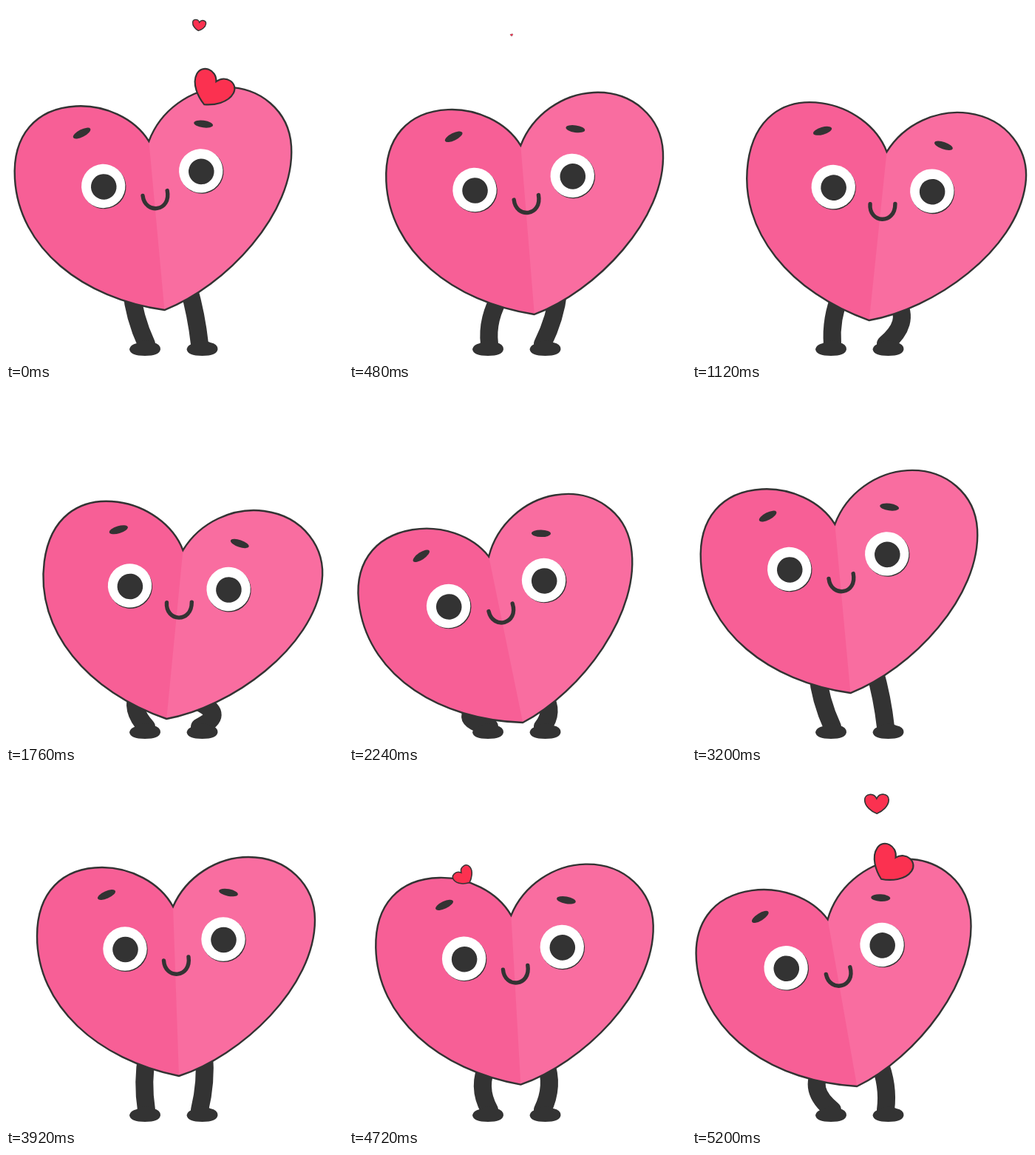
Recreate the animation shown at these times as an HTML page with a canvas. Size 456 by 480 pixels, loop 5280 ms.

```html
<!DOCTYPE html>
<html lang="en">
<head>
<meta charset="utf-8">
<title>Dancing heart</title>
<style>
html, body { margin: 0; width: 100%; height: 100%; overflow: hidden; background: #fff; }
canvas { display: block; }
</style>
</head>
<body>
<canvas id="stage" width="456" height="480"></canvas>
<script>
const ctx = document.getElementById('stage').getContext('2d');
const LOOP = 5280, STEP = 80, BEAT = 800;
const DANCE_END = 3200, WIND_UP = 4560, LAST = LOOP - STEP;
const INK = '#333', RED = '#fb3150', RAD = Math.PI / 180;
const { sin, cos, min, max, PI } = Math;

const leftHalf = 'M-8-229C-26-262-66-282-104-282C-158-282-192-248-192-189C-192-95-110-22 0 0';
const rightHalf = 'C84-27 184-120 184-211C184-258 147-296 94-296C52-296 10-270-8-229Z';
const body = new Path2D(leftHalf + rightHalf);
const shade = new Path2D('M0 0' + rightHalf);
const mouth = new Path2D('M-20.5-156C-19-130 17-132 13-161');
const foot = new Path2D('M-21 464Q-20 458-11 456Q0 449 11 455Q21 457 21 464Q20 473 0 473Q-20 473-21 464Z');
const smallHeart = new Path2D('M0 25C-12 20-28 8-28-7C-28-22-7-25 0-10C7-25 28-22 28-7C28 8 12 20 0 25Z');

// Paths are quadratic curves: start, control, end
const flights = [
  { born: 4640, path: [[155, 140], [244, 62], [270, 10]], turn: [-40, 15] },
  { born: 5040, path: [[270, 124], [314, 78], [220, 39]], turn: [34, -10] }
];

const mix = (a, b, u) => a + (b - a) * u;
const ramp = (t, from, to) => min(1, max(0, (t - from) / (to - from)));
const ease = (t, from, to) => { const u = ramp(t, from, to); return u * u * (3 - 2 * u); };
const bezier = (a, b, c, u) => mix(mix(a, b, u), mix(b, c, u), u);

// Sway once and dip twice per beat
function dance(t) {
  const a = t / BEAT * 2 * PI;
  return {
    x: 231.5 + 19.5 * cos(a - 209 * RAD),
    y: 430 - 22.2 * cos(2 * a - 11 * RAD) + 2.8 * cos(4 * a),
    lean: 9.6 * sin(a - 20 * RAD)
  };
}

// Dance, settle upright, then crouch into the first beat again
function pose(t) {
  if (t <= DANCE_END) return dance(t);
  const wind = ease(t, WIND_UP, LAST);
  const k = wind || 1 - ease(t, DANCE_END, 3600);
  const p = dance(wind ? LAST - LOOP : DANCE_END);
  return {
    x: mix(234, p.x, k),
    y: mix(411, p.y, k) + 20 * sin(PI * wind),
    lean: mix(0, p.lean, k)
  };
}

function place(x, y, degrees, draw) {
  ctx.save();
  ctx.translate(x, y);
  ctx.rotate(degrees * RAD);
  draw();
  ctx.restore();
}

function ellipse(x, y, rx, ry, color, degrees = 0) {
  ctx.fillStyle = color;
  ctx.beginPath();
  ctx.ellipse(x, y, rx, ry, degrees * RAD, 0, 2 * PI);
  ctx.fill();
}

// The knee bows outward as the hip comes down
function leg(side, hip, ankle, footX, { x, y, lean }) {
  const c = cos(lean * RAD), s = sin(lean * RAD);
  const hx = x + hip * c + 30 * s, hy = y + hip * s - 30 * c;
  const slack = max(0, 80 ** 2 - (ankle - hx) ** 2 - (457 - hy) ** 2);
  const bow = 3 + slack * (.0055 + side * .0003 * lean);
  ctx.lineWidth = 24;
  ctx.strokeStyle = ctx.fillStyle = INK;
  ctx.beginPath();
  ctx.moveTo(hx, hy);
  ctx.quadraticCurveTo((hx + ankle) / 2 + side * bow, (hy + 457) / 2, ankle, 457);
  ctx.stroke();
  place(footX, 0, 0, () => ctx.fill(foot));
}

function eye(x, y) {
  ellipse(x + 1, y + 1.2, 29.7, 29.7, INK);
  ellipse(x, y, 29.7, 29.7, '#fff');
  ellipse(x + .5, y + 1, 17.3, 17.3, INK);
}

function drawBody() {
  ctx.fillStyle = '#f75f96';
  ctx.fill(body);
  ctx.fillStyle = '#f96da0';
  ctx.fill(shade);
  ctx.strokeStyle = INK;
  ctx.lineWidth = 2.4;
  ctx.stroke(body);
  eye(-73, -172);
  eye(60, -185);
  ellipse(-98, -245, 13, 5, INK, -24);
  ellipse(67, -248, 13, 4.8, INK, 11);
  ctx.lineWidth = 5.4;
  ctx.stroke(mouth);
}

// A small heart pops up, floats along its curve and shrinks away
function drawFlight({ born, path: [a, b, c], turn }, t) {
  const age = (t - born + LOOP) % LOOP;
  const size = ease(age, 0, 160) * (1 - ramp(age, 430, 740));
  if (!size) return;
  const u = ramp(age, 160, 720);
  place(bezier(a[0], b[0], c[0], u), bezier(a[1], b[1], c[1], u), mix(...turn, u), () => {
    ctx.scale(size, size);
    ctx.fillStyle = RED;
    ctx.fill(smallHeart);
    ctx.strokeStyle = INK;
    ctx.lineWidth = 1.1 + 1 / max(size, .3);
    ctx.stroke(smallHeart);
  });
}

ctx.lineCap = 'round';
const start = performance.now();
function frame() {
  // Each pose is held for one step
  const t = Math.floor((performance.now() - start) % LOOP / STEP) * STEP;
  const p = pose(t);
  ctx.fillStyle = '#fff';
  ctx.fillRect(0, 0, 456, 480);
  leg(-1, -43, 190, 188, p);
  leg(1, 34, 262, 265.5, p);
  place(p.x, p.y, p.lean, drawBody);
  flights.forEach(f => drawFlight(f, t));
  requestAnimationFrame(frame);
}
frame();
</script>
</body>
</html>
```
